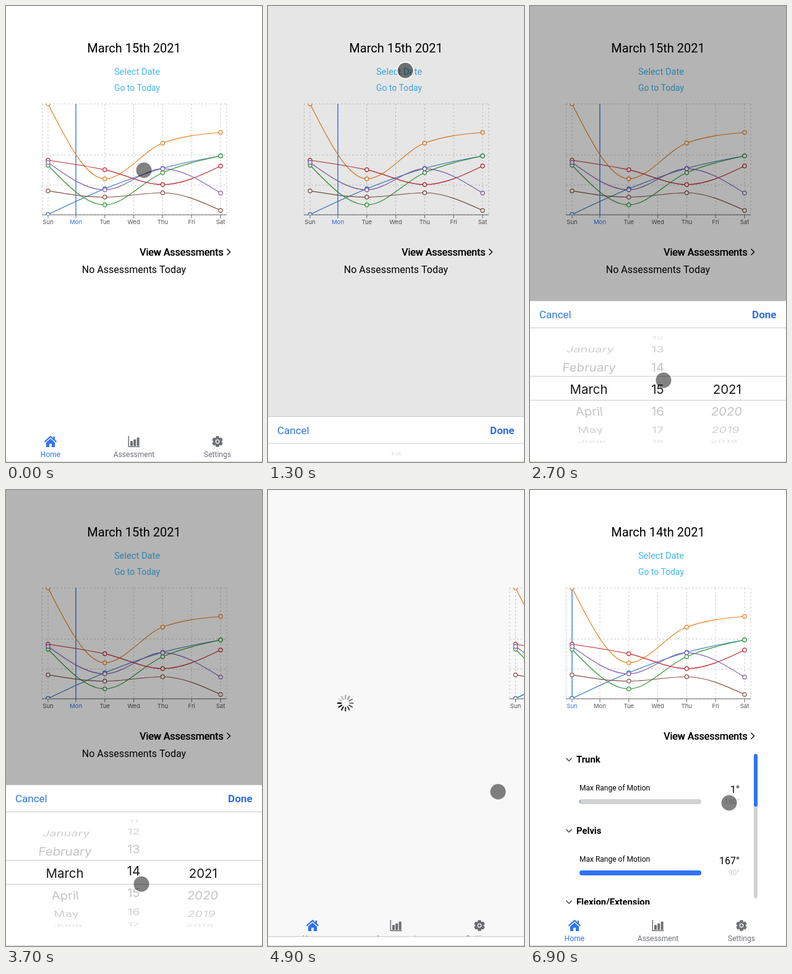
These frames come from a looping animation (414x736 px, 7000 ms). An HTML page with a canvas:

```html
<!DOCTYPE html>
<html lang="en">
<head>
<meta charset="utf-8">
<title>Assessment calendar</title>
<style>
html, body { margin: 0; width: 100%; height: 100%; overflow: hidden; background: #fff; }
canvas { display: block; width: 414px; height: 736px; }
</style>
</head>
<body>
<canvas id="stage"></canvas>
<script>
const W = 414, H = 736, LOOP = 7000;
const BLUE = '#2f73f6', LINK = '#3fb6ef', GRAY = '#6d7075';
const canvas = document.getElementById('stage');
const ratio = window.devicePixelRatio || 1;
canvas.width = W * ratio;
canvas.height = H * ratio;
const ctx = canvas.getContext('2d');

const ease = p => (1 - Math.cos(Math.PI * p)) / 2;
const ramp = (t, start, end) => ease(Math.min(1, Math.max(0, (t - start) / (end - start))));

function text(str, x, mid, size, { color = '#000', align = 'center', weight = 400, family = 'Roboto' } = {}) {
  ctx.font = `${weight} ${size}px ${family}, sans-serif`;
  ctx.textAlign = align;
  ctx.fillStyle = color;
  ctx.fillText(str, x, Math.round(mid + size * 0.355));
}

function line(points, color, width = 1, dash = []) {
  ctx.beginPath();
  points.forEach(([x, y]) => ctx.lineTo(x, y));
  ctx.setLineDash(dash);
  ctx.strokeStyle = color;
  ctx.lineWidth = width;
  ctx.stroke();
  ctx.setLineDash([]);
}

function rect(x, y, w, h, color, radius = 0) {
  ctx.beginPath();
  ctx.roundRect(x, y, w, h, radius);
  ctx.fillStyle = color;
  ctx.fill();
}

function circle(x, y, r, fill, stroke, width = 1.2) {
  ctx.beginPath();
  ctx.arc(x, y, r, 0, 2 * Math.PI);
  if (fill) { ctx.fillStyle = fill; ctx.fill(); }
  if (stroke) { ctx.strokeStyle = stroke; ctx.lineWidth = width; ctx.stroke(); }
}

function shifted(x, y, draw) {
  ctx.save();
  ctx.translate(x, y);
  draw();
  ctx.restore();
}

// Chart
const DAYS = ['Sun', 'Mon', 'Tue', 'Wed', 'Thu', 'Fri', 'Sat'];
const dayX = i => i ? 113 + (i - 1) * 46.8 : 68;
const SERIES = [
  ['#2a6fb0', 336.5, 295, 262, 242],
  ['#e8801f', 158, 279, 221.3, 204],
  ['#2f9a37', 257, 321, 269, 242],
  ['#c1272d', 249, 264.3, 288.3, 258.3],
  ['#8460b4', 252.5, 296.7, 262.7, 302],
  ['#855248', 298.4, 308.5, 301.5, 330]
];

function monotoneCurve(pts) {
  const h = [], s = [];
  for (let i = 0; i < pts.length - 1; i++) {
    h[i] = pts[i + 1][0] - pts[i][0];
    s[i] = (pts[i + 1][1] - pts[i][1]) / h[i];
  }
  const m = pts.map((_, i) => {
    if (!i || i === s.length) return 0;
    const p = (s[i - 1] * h[i] + s[i] * h[i - 1]) / (h[i - 1] + h[i]);
    return (Math.sign(s[i - 1]) + Math.sign(s[i])) *
      Math.min(Math.abs(s[i - 1]), Math.abs(s[i]), Math.abs(p) / 2);
  });
  const n = s.length;
  m[0] = (3 * s[0] - m[1]) / 2;
  m[n] = (3 * s[n - 1] - m[n - 1]) / 2;
  ctx.beginPath();
  ctx.moveTo(...pts[0]);
  for (let i = 0; i < n; i++) {
    const [x0, y0] = pts[i], [x1, y1] = pts[i + 1], d = h[i] / 3;
    ctx.bezierCurveTo(x0 + d, y0 + m[i] * d, x1 - d, y1 - m[i + 1] * d, x1, y1);
  }
}

function drawChart(today) {
  const grid = (...points) => line(points, '#ccc', 1, [3, 3]);
  for (const y of [158, 240.5, 289, 337]) grid([58, y], [357, y]);
  for (const x of [58.5, ...DAYS.map((_, i) => dayX(i)), 357]) grid([x, 158], [x, 337]);
  line([[58, 337], [357, 337]], '#666');
  DAYS.forEach((day, i) => {
    line([[dayX(i), 337], [dayX(i), 342.5]], '#666');
    text(day, dayX(i), 349, 9.6, { color: i === today ? BLUE : '#555', family: 'Inter' });
  });
  line([[dayX(today), 158], [dayX(today), 337]], BLUE, 1.3);

  ctx.save();
  ctx.beginPath();
  ctx.rect(58, 157.5, 300, 179.5);
  ctx.clip();
  for (const [color, ...ys] of SERIES) {
    const pts = ys.map((y, i) => [dayX(i * 2), y]);
    monotoneCurve(pts);
    ctx.strokeStyle = color;
    ctx.lineWidth = 1.2;
    ctx.stroke();
    for (const [x, y] of pts) circle(x, y, 3.1, '#fff', color);
  }
  ctx.restore();
}

// Home screen
function drawSection(title, y, value, limit, share) {
  line([[58.5, y - 2.2], [63, y + 2.3], [67.5, y - 2.2]], '#444', 1.5);
  text(title, 75, y, 14.8, { align: 'left', weight: 700 });
  if (!value) return;
  text('Max Range of Motion', 80, y + 46, 12, { align: 'left' });
  text(value, 339, y + 48.5, 16, { align: 'right' });
  text(limit, 339, y + 68, 12, { align: 'right', color: '#ccc' });
  rect(80, y + 64, 197, 8, '#d2d2d2', 4);
  ctx.save();
  ctx.beginPath();
  ctx.roundRect(80, y + 64, 197, 8, 4);
  ctx.clip();
  rect(80, y + 64, 197 * share, 8, BLUE);
  ctx.restore();
}

function drawHome(picked) {
  text(picked ? 'March 14th 2021' : 'March 15th 2021', 207, 68, 20);
  text('Select Date', 212, 106, 14.7, { color: LINK });
  text('Go to Today', 212, 132, 13.9, { color: LINK });
  drawChart(picked ? 0 : 1);
  for (const dx of [0, 0.6]) text('View Assessments', 216 + dx, 397.5, 16, { align: 'left' });
  line([[357.5, 392], [362.5, 397], [357.5, 402]], '#111', 1.5);
  if (!picked) {
    text('No Assessments Today', 207, 425.5, 16);
    return;
  }
  ctx.save();
  ctx.beginPath();
  ctx.rect(0, 426, W, 243);
  ctx.clip();
  drawSection('Trunk', 435, '1°', '180°', 1 / 180);
  drawSection('Pelvis', 550, '167°', '90°', 1);
  drawSection('Flexion/Extension', 665);
  ctx.restore();
  rect(362, 426, 6, 233, '#d2d2d2', 3);
  rect(362, 426, 6, 85, BLUE, 3);
}

function drawSpinner(t) {
  const head = Math.floor((t - 4900) * 12 / 1000 + 9.5);
  for (let i = 0; i < 12; i++) {
    const age = (((head - i) % 12) + 12) % 12;
    ctx.save();
    ctx.translate(207, 344);
    ctx.rotate(i * Math.PI / 6);
    rect(-1.1, -13.5, 2.2, 7.5, `rgba(0,0,0,${1 - age * 0.075})`, 1);
    ctx.restore();
  }
}

// Tab bar
function drawTabs() {
  rect(0, 680, W, 56, '#fff');
  text('Home', 72, 724, 12, { color: BLUE });
  text('Assessment', 207, 724, 12, { color: GRAY });
  text('Settings', 342, 724, 12, { color: GRAY });

  shifted(72, 703, () => {
    line([[-9.5, 0.5], [0, -8], [9.5, 0.5]], BLUE, 2.2);
    rect(4.5, -8, 2.6, 6, BLUE);
    ctx.beginPath();
    [[0, -4.8], [7, 1.5], [7, 9], [2, 9], [2, 3.5], [-2, 3.5], [-2, 9], [-7, 9], [-7, 1.5]]
      .forEach(p => ctx.lineTo(...p));
    ctx.fillStyle = BLUE;
    ctx.fill();
  });
  shifted(207, 703, () => {
    line([[-8.7, -9], [-8.7, 8.3], [9.5, 8.3]], GRAY, 1.5);
    rect(-6, -1, 4, 8, GRAY, 1);
    rect(-0.8, -3.5, 4, 10.5, GRAY, 1);
    rect(4.6, -6.5, 4, 13.5, GRAY, 1);
  });
  shifted(342, 703, () => {
    for (let i = 0; i < 6; i++) {
      ctx.rotate(Math.PI / 3);
      rect(-2.8, -8.8, 5.6, 6, GRAY, 1.2);
    }
    circle(0, 0, 6.8, GRAY);
    circle(0, 0, 2.8, null, '#fff', 1.3);
  });
}

// Date picker
const MONTHS = ['January', 'February', 'March', 'April', 'May', 'June'];
const STEP = 0.4136, RADIUS = 88;

function drawWheel(x, position, label) {
  for (let i = Math.ceil(position - 3.6); i <= position + 3.6; i++) {
    const str = label(i);
    if (!str) continue;
    const k = i - position, angle = k * STEP, depth = Math.cos(angle);
    const dx = x - 207, scale = 1 - (1 - depth) * 0.07;
    const alpha = Math.abs(k) < 0.5 ? 0.9 : 0.25 * (0.25 + 0.75 * depth);
    ctx.save();
    ctx.translate(207 + dx * scale, 143.3 + RADIUS * Math.sin(angle));
    ctx.transform(scale, 0, -dx * 0.0025 * Math.sin(angle) * depth, depth, 0, 0);
    text(str, 0, 0, 20.5, { family: 'Inter', color: `rgba(0,0,0,${alpha})` });
    ctx.restore();
  }
}

function drawPicker(top, day, showWheels) {
  shifted(0, top, () => {
    rect(0, 0, W, 262, '#fff');
    line([[0, 0], [W, 0]], '#c4c4c4');
    text('Cancel', 15, 22.3, 17, { align: 'left', color: '#2f76e4' });
    text('Done', 398.5, 22.3, 17, { align: 'right', weight: 700, color: '#2f6fe4' });
    for (const y of [43.5, 121.8, 160.3]) line([[0, y], [W, y]], '#c8c8c8');
    if (!showWheels) return;
    drawWheel(95, 3, i => MONTHS[i - 1]);
    drawWheel(206.5, day, i => String(i));
    drawWheel(318.8, 0, i => i >= 0 && String(2021 - i));
  });
}

// Touch pointer: time, x, y
const POINTER = [
  [0, 223, 265], [150, 223, 265], [950, 222, 104], [1380, 222, 104], [1700, 254, 577],
  [1950, 254, 577], [2600, 216, 604], [2950, 216, 604], [3650, 219, 636], [3850, 219, 636],
  [4450, 372, 487], [5900, 372, 487], [6720, 322, 505], [LOOP, 322, 505]
];
const PRESSES = [[1120, 1380], [2900, 3650], [4560, 4790]];

function drawPointer(t) {
  const next = POINTER.findIndex(key => key[0] > t);
  const [t0, x0, y0] = POINTER[next - 1], [t1, x1, y1] = POINTER[next];
  const p = ramp(t, t0, t1), x = x0 + (x1 - x0) * p, y = y0 + (y1 - y0) * p;
  const pressed = PRESSES.some(([from, to]) => t >= from && t < to);
  circle(x, y, 12.5, pressed ? 'rgba(0,0,0,.52)' : 'rgba(0,0,0,.49)');
  if (pressed) circle(x, y, 13.4, null, 'rgba(255,255,255,.75)', 2);
}

function draw(t) {
  ctx.setTransform(ratio, 0, 0, ratio, 0, 0);
  rect(0, 0, W, H, '#fff');

  const slide = W * (ramp(t, 4667, 4998) - ramp(t, 5180, 5500));
  const picked = t >= 5090;
  if (slide < W) shifted(slide, 0, () => drawHome(picked));
  if (slide > 0) shifted(slide - W, 0, () => drawSpinner(t));
  drawTabs();

  const dim = 0.295 * (ramp(t, 1172, 1505) - ramp(t, 4635, 4968));
  if (dim > 0) rect(0, 0, W, H, `rgba(0,0,0,${dim})`);
  const open = ramp(t, 1194, 1494) - ramp(t, 4645, 4948);
  if (open > 0) {
    const day = 15 - 0.876 * ramp(t, 2950, 3650) - 0.124 * ramp(t, 3710, 3950);
    drawPicker(H - 260 * open, day, t < 4645);
  }
  line([[0, 735.5], [W, 735.5]], '#d8d8d8');
  drawPointer(t);
}

const start = performance.now();
function tick() {
  draw((performance.now() - start) % LOOP);
  requestAnimationFrame(tick);
}
tick();
</script>
</body>
</html>
```
